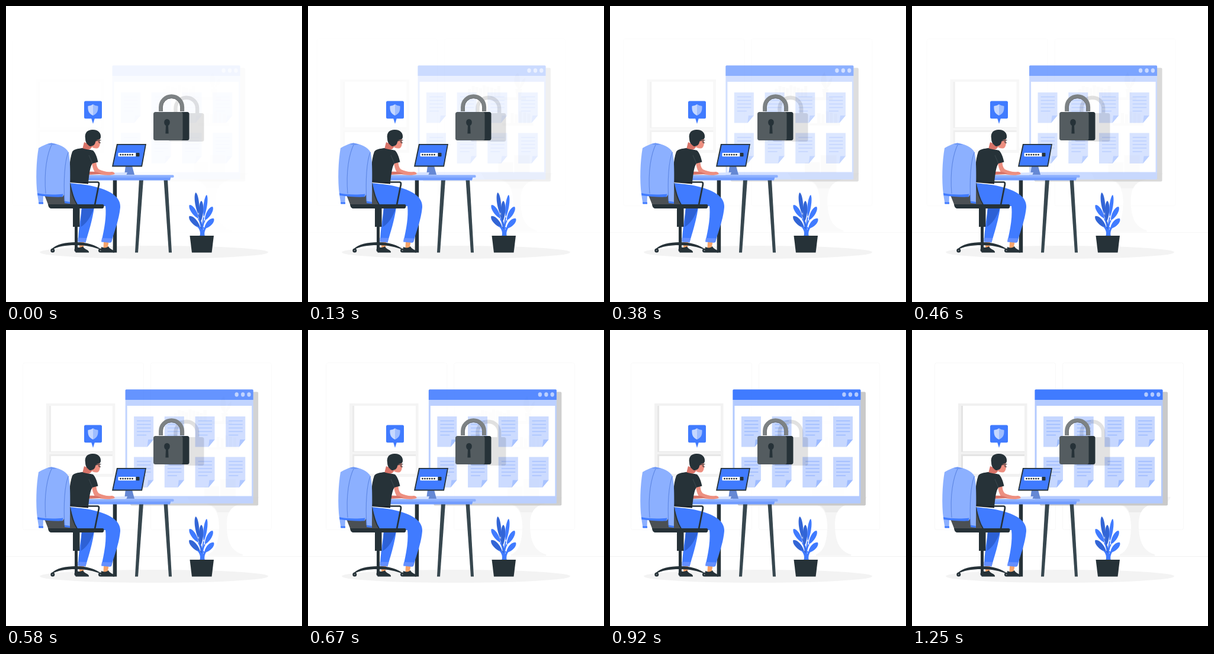
An HTML page for the animation above (1.33 s loop, 500 px wide and 500 px high).

```html
<!DOCTYPE html>
<html lang="en">
<head>
<meta charset="utf-8">
<title>Secure desk</title>
<style>
html, body { margin: 0; width: 100%; height: 100%; overflow: hidden; background: #fff; }
svg { display: block; width: 100vw; height: 100vh; }
</style>
</head>
<body>
<svg viewBox="0 0 500 500" xmlns="http://www.w3.org/2000/svg">
  <rect width="500" height="500" fill="#fff"/>

  <g id="room">
    <g fill="none" stroke="#f8f8f8">
      <rect x="38.500" y="55.500" width="204" height="282" rx="3"/>
      <rect x="254.500" y="55.500" width="204" height="282" rx="3"/>
      <path d="M-10 382.500H520" stroke="#f1f1f1"/>
    </g>
    <rect x="78" y="124" width="116.500" height="124" fill="#f1f1f1"/>
    <path d="M83 128H190V206H83ZM83 210H190V243H83Z" fill="#e4e4e4"/>
    <path d="M86 128H190V205H86ZM86 213H190V243H86Z" fill="#fff"/>
    <g fill="#efefef">
      <path d="M290 154H392V159H290ZM352 198H404V202H352Z"/>
      <g id="books"></g>
      <path d="M374 140h11l-2 14h-7ZM379 140C368 128 372 118 378 112C383 122 382 130 380 140C383 128 387 122 391 121C391 130 386 136 381 140Z"/>
      <path d="M345 264h25v18h-25ZM372 252h26v30h-26Z"/>
    </g>
    <g fill="#f5f5f5">
      <path d="M316 282H437L431 293H322Z"/>
      <path d="M342 293C362 296 369 306 370 330C370 358 364 374 351 379V381.500H410V379C391 374 383 357 383 330C383 307 390 297 411 293Z"/>
      <path d="M350 293H408C396 296 390 301 387 308H367C364 300 359 296 350 293Z" fill="#ebebeb"/>
    </g>
  </g>

  <ellipse cx="250" cy="416" rx="193" ry="11" fill="#f3f3f3"/>

  <g id="panel">
    <rect x="216" y="104.500" width="216" height="192" rx="2" fill="#c9c9c9"/>
    <rect x="207.500" y="100.500" width="216" height="192.500" rx="1.500" fill="#b3caff"/>
    <path d="M207.500 118V102a1.500 1.500 0 0 1 1.500-1.500h213a1.500 1.500 0 0 1 1.500 1.500V118Z" fill="#407bff"/>
    <rect x="210.500" y="128" width="210.500" height="152.500" fill="#fff"/>
    <g fill="#b3caff">
      <ellipse cx="395.500" cy="109" rx="3.200" ry="3.700"/>
      <ellipse cx="406" cy="109" rx="3.200" ry="3.700"/>
      <ellipse cx="416.300" cy="109" rx="3.200" ry="3.700"/>
    </g>
    <g id="docs"></g>
  </g>

  <!-- padlock -->
  <g opacity=".11">
    <path d="M286.500 181V173a18.300 18.300 0 0 1 36.600 0V181" fill="none" stroke="#000" stroke-width="6.500"/>
    <rect x="274.500" y="181" width="60" height="48" rx="3.500"/>
  </g>
  <path d="M261.300 178V170.800a18.300 18.300 0 0 1 36.600 0V178" fill="none" stroke="#7d8284" stroke-width="6.500"/>
  <path d="M264.300 178V170.800a15.200 15.200 0 0 1 30.400 0V178" fill="none" stroke="#65696b" stroke-width="1"/>
  <rect x="255" y="179" width="54.500" height="48" rx="3.500" fill="#263238"/>
  <path d="M252.500 179H295Q298.500 179 298.500 182.500V223.500Q298.500 227 295 227H252.500Q249 227 249 223.500V182.500Q249 179 252.500 179Z" fill="#545c60"/>
  <path d="M272 191c6.200 0 6 9 2 11l.6 13.500h-5.200l.6-13.500c-4-2-4.200-11 2-11Z" fill="#263238"/>

  <!-- bubble -->
  <rect x="132" y="160.500" width="30" height="29.700" rx="2.500" fill="#407bff"/>
  <path d="M144 189.500h6l-3 9.500Z" fill="#407bff"/>
  <path d="M147 166Q143 169 138.500 169C138 177 140 182 147 185Z" fill="#c6d8ff"/>
  <path d="M147 166Q151 169 155.500 169C156 177 154 182 147 185Z" fill="#9fbdff"/>

  <!-- desk -->
  <path d="M180.700 293h6.500V416.500h-6.500Z" fill="#263238"/>
  <path d="M225 293h7L223 416.500h-5Z" fill="#37474f"/>
  <path d="M266.500 293h6.500L280 416.500h-5Z" fill="#37474f"/>
  <path d="M130 289H278.500L277 294.500H130Z" fill="#719cff"/>
  <rect x="125" y="285.500" width="158.500" height="4.300" rx="1.500" fill="#8cb0ff"/>

  <!-- computer -->
  <path d="M202 270H213L217 285H200Z" fill="#6588d4"/>
  <path d="M187 233H237L230 271.500H179Z" fill="#263238"/>
  <path d="M188.700 234.700H235L228.500 269.500H181.200Z" fill="#407bff"/>
  <rect x="189.500" y="248" width="30" height="6.300" rx="1" fill="#fff"/>
  <path d="M193.500 251.200h21" stroke="#263238" stroke-width="2.800" stroke-linecap="round" stroke-dasharray="0 4"/>
  <rect x="219.500" y="248" width="6" height="6.300" rx="1" fill="#263238"/>
  <path d="M178 285L184 281.500L205 281L203.500 285Z" fill="#d5e2ff"/>

  <!-- legs -->
  <path d="M128 340H149C146 362 140 380 134.500 399L122 398C122 380 126 360 128 340Z" fill="#407bff"/>
  <path d="M128 340H149C144 355 136 368 126.500 373C127 362 127 350 128 340Z" fill="#2d61d5"/>
  <path d="M121.500 391.500L136 392L134.500 399.500L121.300 398.500Z" fill="#648fff"/>
  <path d="M124 399h8l-1 10h-7ZM165 399h8.500l-2 10h-7Z" fill="#f5a46c"/>
  <path d="M108 299C125 301 140 302 153 306C179 313 194 324 193 340C191 362 183 380 178 399L161.500 396.500C166 377 170 356 168 338L120 338C111 326 108 314 108 299Z" fill="#407bff"/>
  <path d="M162 392L179 392.500L176.500 400L161 398.500Z" fill="#648fff"/>
  <path d="M118 406C122 409 127 408 130 406C132 411 138 411 140 415V416.500H117.500ZM161 407C165 409 170 409 173 406C175 411 181 411 183 415V416.500H160.500Z" fill="#263238"/>

  <!-- figure -->
  <path d="M132 230L146 236C144 242 139 245 129 242Z" fill="#d77368"/>
  <path d="M143 227L158 222C160 231 159 239 154 240.500C149 241 145 239 142 235Z" fill="#ed8f80"/>
  <path d="M134 224C132 213 139 208.500 147 209C156 209 161 215 160 222C159 228 152 224 151 230C150 235 146 237 142 237C138 235 134 231 134 224Z" fill="#263238"/>
  <path d="M151 228L160.500 226.500M157 227.500v3.500h3" fill="none" stroke="#263238" stroke-width="1"/>
  <path d="M144 262L153 261C152 268 154 273 157 276C164 279 171 281 178 280C181 280 184 281 183.500 284C176 287 161 286 151 282C147 277 146 270 144 262Z" fill="#ed8f80"/>
  <path d="M140 280C148 279 156 280 162 284L140 285Z" fill="#d77368"/>
  <path d="M129 240C135 243 142 242 147 244C152 249 154 257 155.500 263.500L146 266C143 270 141 278 139 300L108 297C106 280 107 260 112 246C116 241 123 241 129 240Z" fill="#263238"/>
  <path d="M108 294L139 297V300.500L108 298Z" fill="#1b2024"/>
  <path d="M140 252L146 266" stroke="#455158" stroke-width=".700"/>

  <!-- chair -->
  <path d="M64 317H98L108 298C112 311 115 325 120 337L73 340Z" fill="#4b5054"/>
  <path d="M108 299C110 314 114 326 121 337" fill="none" stroke="#263238" stroke-width="1.800"/>
  <path d="M71 335H163Q165.500 335 165.500 338T163 342H76Q72 342 71 335Z" fill="#263238"/>
  <path d="M110 296.500H138M140 297.500H155C158 298 157 302 156 306L150 336" fill="none" stroke="#263238" stroke-width="2.700" stroke-linecap="round"/>
  <path d="M113 341h11.500v32h-11.500ZM116 372h5v38h-5Z" fill="#263238"/>
  <path d="M76 412C84 402 101 399 118 399S152 403 161 412C148 407 136 404 118 404S89 406 76 412Z" fill="#263238"/>
  <g fill="#263238"><circle cx="78.800" cy="413" r="3.500"/><circle cx="159.500" cy="413" r="3.500"/><circle cx="119" cy="412" r="3.500"/></g>
  <g fill="#8a9195"><circle cx="78.800" cy="413" r="1"/><circle cx="159.500" cy="413" r="1"/></g>

  <!-- jacket -->
  <path d="M55 240C62 236 70 232 77 231.500C90 233 101 239 105 246C110 258 108 300 108 333L99 332L98.500 318L96 322L63 319L62.500 334H55.500L53 318C50 295 51 262 55 240Z" fill="#8cb0ff"/>
  <path d="M53 316C67 319 83 319 96.500 317.500L95.500 322.500C82 323 67 322 53.500 320ZM99 329.500L108 331V334L99 333ZM55 331.500H63V334.500H55.500Z" fill="#407bff"/>
  <path d="M78 232.500C69 250 64 280 67 317M105.500 247C99 261 97 295 99 330" fill="none" stroke="#5e87e4" stroke-width="1.100"/>
  <path d="M70 233L77 231.500L86 234C81 235 75 235 70 233Z" fill="#6d97f5"/>

  <!-- plant -->
  <g id="plant"></g>
  <path d="M310.500 388H351L347.500 416.500H314Z" fill="#263238"/>
</svg>
<script>
const $ = id => document.getElementById(id);
const LOOP = 1330, LEAD = 40, SHIFT = 30;

function page(x, y) {
  let lines = "";
  for (let i = 0; i < 5; i++) lines += `M${x + 5} ${y + 7.5 + i * 6}h${i < 4 ? 23.5 : 16}`;
  return `<path d="M${x} ${y}h33v39l-10.500 12.500h-22.500Z" fill="#c6d7ff"/>
    <path d="M${x + 33} ${y + 39}h-9l-1.500 12.500Z" fill="#9dbbff"/>
    <path d="${lines}" stroke="#9dbbff" stroke-width="1.300"/>`;
}

// Stem from the pot to the leaf foot, then a pointed oval to its tip.
function leaf([fx, fy, tx, ty, w, color]) {
  const dx = tx - fx, dy = ty - fy, len = Math.hypot(dx, dy);
  const nx = -dy / len * w, ny = dx / len * w;
  const side = s => [fx + dx * .3 + nx * s, fy + dy * .3 + ny * s,
                     fx + dx * .9 + nx * s, fy + dy * .9 + ny * s];
  const [a, b, c, d] = side(1), [e, f, g, h] = side(-1);
  return `<path d="M331 389Q331 370 ${fx} ${fy}" fill="none" stroke="${color}" stroke-width="2"/>
    <path d="M${fx} ${fy}C${a} ${b} ${c} ${d} ${tx} ${ty}C${g} ${h} ${e} ${f} ${fx} ${fy}Z" fill="${color}"/>`;
}

const blue = "#407bff", deep = "#3265d6";
$("plant").innerHTML = [
  [325, 352, 320.5, 315, 4.5, deep],
  [334, 357, 339, 319, 4, blue],
  [329, 364, 330, 329, 5, deep],
  [325, 359, 310, 336, 5.5, blue],
  [336, 362, 349, 339, 5.5, blue],
  [328, 375, 309.5, 355, 6, deep],
  [335, 376, 351, 359, 6, blue]
].map(leaf).join("") + `<path d="M327 389C330 382 326 375 321 371C328 373 331 376 332 380C334 375 338 372 342 370C336 377 334 383 336 389Z" fill="${blue}"/>`;

let docs = "", books = "";
for (const y of [146, 214.5])
  for (let i = 0; i < 4; i++) docs += page(222 + i * 51.7, y);
for (let i = 0; i < 14; i++) {
  const low = i > 8, h = 14 + i * 5 % 7;
  const x = low ? 366 + (i - 9) * 7 : 294 + i * 6.2;
  books += `<rect x="${x}" y="${(low ? 198 : 154) - h}" width="5" height="${h}"/>`;
}
$("docs").innerHTML = docs;
$("books").innerHTML = books;

// Cubic bezier (0, 0, .58, 1)
function easeOut(p) {
  if (p >= 1) return 1;
  let lo = 0, hi = 1;
  for (let i = 0; i < 24; i++) {
    const s = (lo + hi) / 2;
    if (s * s * (1.74 - .74 * s) < p) lo = s; else hi = s;
  }
  return lo * lo * (3 - 2 * lo);
}

function slideIn(id, t, span) {
  const e = easeOut((t + LEAD) / span);
  $(id).setAttribute("transform", `translate(${(e - 1) * SHIFT} 0)`);
  $(id).setAttribute("opacity", e);
}

function draw(t) {
  slideIn("room", t, 1290);
  slideIn("panel", t, 1000);
}

const start = performance.now();
function tick() {
  draw((performance.now() - start) % LOOP);
  requestAnimationFrame(tick);
}
tick();
</script>
</body>
</html>
```
